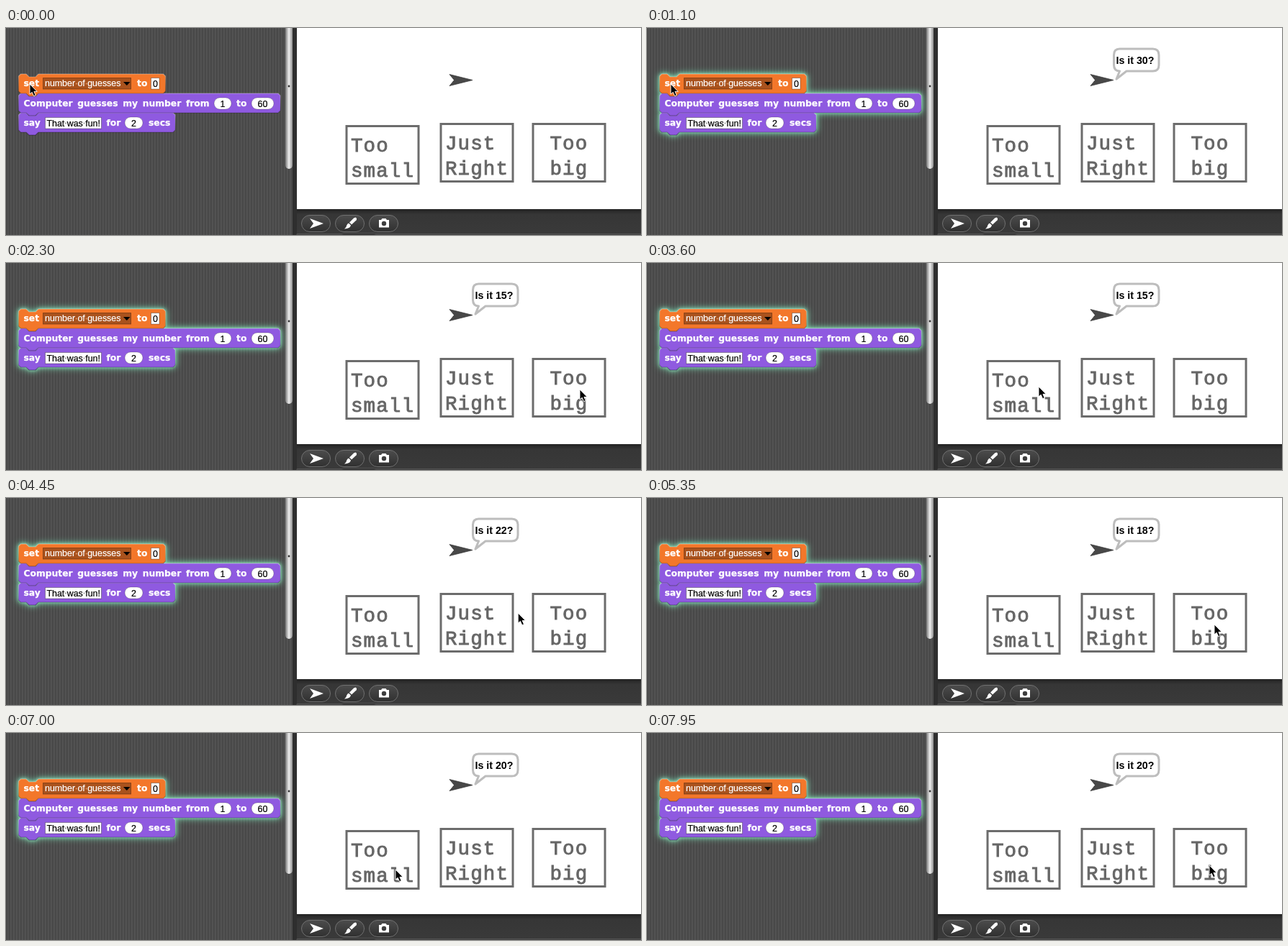
Recreate the animation shown at these times as an HTML page. Size 882 by 288 pixels, loop 8000 ms.

```html
<!DOCTYPE html>
<html lang="en">
<head>
<meta charset="utf-8">
<title>Guessing game</title>
<style>
  html, body { margin: 0; width: 100%; height: 100%; overflow: hidden; background: #333; }
  svg { display: block; width: 882px; height: 288px; }
  .label { font: bold 12.3px "DejaVu Sans", sans-serif; word-spacing: 2.4px; fill: #fff; stroke: #fff; stroke-width: .25; }
  .value, .variable { font: 12.4px "Liberation Sans", sans-serif; fill: #000; stroke: #000; stroke-width: .2; }
  .variable { fill: #fff; stroke: #fff; }
  .choice { font: 27.5px "Liberation Mono", monospace; letter-spacing: 1.1px; fill: #666; stroke: #666; stroke-width: .9; }
  .speech { font: bold 14.2px "Liberation Sans", sans-serif; text-anchor: middle; }
  .glow { filter: drop-shadow(0 0 2px #8fd8b8) drop-shadow(0 0 5px #78d8ad); }
</style>
</head>
<body>
<svg viewBox="0 0 882 288">
  <defs>
    <pattern id="stripes" width="4" height="4" patternUnits="userSpaceOnUse">
      <rect width="4" height="4" fill="#525252"/>
      <rect width="1.6" height="4" fill="#464646"/>
    </pattern>
    <linearGradient id="bevel" x2="0" y2="1">
      <stop offset="0" stop-color="#fff" stop-opacity=".35"/>
      <stop offset=".3" stop-color="#fff" stop-opacity=".1"/>
      <stop offset=".7" stop-color="#000" stop-opacity=".1"/>
      <stop offset="1" stop-color="#000" stop-opacity=".4"/>
    </linearGradient>
    <linearGradient id="handle">
      <stop offset="0" stop-color="#777"/>
      <stop offset=".5" stop-color="#f0f0f0"/>
      <stop offset="1" stop-color="#8c8c8c"/>
    </linearGradient>
    <linearGradient id="bar" x2="0" y2="1">
      <stop offset="0" stop-color="#222"/>
      <stop offset=".2" stop-color="#363636"/>
      <stop offset="1" stop-color="#3a3a3a"/>
    </linearGradient>
    <linearGradient id="button" x2="0" y2="1">
      <stop offset="0" stop-color="#4c4c4c"/>
      <stop offset="1" stop-color="#303030"/>
    </linearGradient>
  </defs>

  <rect width="398" height="288" fill="url(#stripes)"/>
  <rect x="388" y="-20" width="10" height="216" rx="5" fill="url(#handle)"/>
  <rect x="398" width="6" height="288" fill="#2e2e2e"/>
  <circle cx="393" cy="81" r="1.4" fill="#333"/>

  <rect x="404" y="0" width="478" height="252" fill="#fff"/>
  <rect x="404" y="252" width="478" height="36" fill="url(#bar)"/>
  <path d="M404 286.5H466L469 285.5H511L514 286.5H882V288H404Z" fill="#2a2a2a" stroke="#555"/>
  <g id="buttons" fill="url(#button)" stroke="#707070"></g>
  <g fill="#fff">
    <path d="M422 265L441 272L422 279L427 272Z"/>
    <path d="M485.500 263.500Q488 265 486.500 267.500L480 273.500L477 270.500L483 264.500Z"/>
    <path d="M476 271.500L479 274.500Q478 279 470 279.500Q473 277.500 473 275Q474 272 476 271.500Z"/>
    <path fill-rule="evenodd" d="M518 267H521L522.5 265H527.5L529 267H532V277.5H518ZM525 268.800A3.200 3.200 0 1 0 525 275.200A3.200 3.200 0 1 0 525 268.800Z"/>
  </g>

  <g id="script"></g>
  <g id="choices"></g>
  <path d="M616 64.5L648 72.500L616 80.500L622.500 72.500Z" fill="#484848" stroke="#303030" stroke-width=".7"/>
  <path id="tail" d=""/>
  <g id="bubble">
    <path d="M656.5 29H702.500Q711 29 711 37.500V51.500Q711 60 702.500 60H666L652 71L656.500 60Q648.500 59.500 648.500 51.500V37.500Q648.500 29 656.500 29Z"
      fill="#fff" stroke="#bdbdbd" stroke-width="3" stroke-linejoin="round"/>
    <text id="speech" class="speech" x="678" y="50"></text>
  </g>
  <path id="cursor" d="M0 0V14L3.2 11.3L5.6 16.7L8.2 15.6L5.9 10.4H10.2Z" fill="#000" stroke="#fff" stroke-width=".9"/>
</svg>
<script>
const $ = id => document.getElementById(id);
const ORANGE = '#f3772a', PURPLE = '#8f5ae0';

const text = (cls, x, y, words) => `<text class="${cls}" x="${x}" y="${y}">${words}</text>`;
const rect = (x, y, w, h, attrs) => `<rect x="${x}" y="${y}" width="${w}" height="${h}" ${attrs}/>`;
const dot = (x, y, color) => `<circle cx="${x}" cy="${y}" r=".9" fill="${color}"/>`;
const pill = (x, y, w) => rect(x, y, w, 16, 'rx="8" fill="#fff" stroke="#0004" stroke-width=".8"');
const field = (x, y, w, fill) => rect(x, y, w, 15.5, `fill="${fill}" stroke="#0005"`);

// Command block with a dent in its top edge and a matching tab below.
function block(y, width, color) {
  const x = 17.5, right = x + width, bottom = y + 27;
  const d = `M${x} ${y + 3}L${x + 3} ${y}H28L32 ${y + 4}H41L45 ${y}H${right - 3}L${right} ${y + 3}
    V${bottom - 3}L${right - 3} ${bottom}H45L41 ${bottom + 4}H32L28 ${bottom}H${x + 3}L${x} ${bottom - 3}Z`;
  return `<path d="${d}" fill="${color}" stroke="url(#bevel)" stroke-width="1.2"/>`;
}

$('script').innerHTML = [
  block(118, 217.5, PURPLE), block(91, 363.5, PURPLE), block(64, 204, ORANGE),
  text('label', 24.5, 81, 'set'), field(51.5, 69.5, 122, '#a9521d'),
  text('variable', 54, 81, 'number of guesses'), dot(97.8, 77.5, '#e8a070'), dot(111.6, 77.5, '#e8a070'),
  '<path d="M163 75H172.5L167.8 80Z"/>',
  text('label', 182, 81, 'to'), field(201.5, 69.5, 11.5, '#fff'), text('value', 204, 81.5, '0'),
  text('label', 24.5, 109, 'Computer guesses my number from'),
  pill(289, 97, 24), text('value', 297.5, 109.5, '1'), text('label', 320, 109, 'to'),
  pill(341, 97, 31), text('value', 349.5, 109.5, '60'),
  text('label', 24.5, 136, 'say'), field(54.5, 124.5, 78, '#fff'), text('value', 56.5, 136.5, 'That was fun!'),
  dot(83, 132.5, '#888'), dot(108.5, 132.5, '#888'),
  text('label', 139.5, 136, 'for'), pill(165, 124, 25), text('value', 174, 136.5, '2'),
  text('label', 198, 136, 'secs')
].join('');

const choice = (x, y, textX, top, bottom) =>
  rect(x, y, 100, 80, 'fill="none" stroke="#6c6c6c" stroke-width="3"') +
  text('choice', textX, y + 35, top) + text('choice', textX, y + 70, bottom);
$('choices').innerHTML = choice(473, 136.5, 479, 'Too', 'small') +
  choice(604, 133.5, 610, 'Just', 'Right') + choice(732, 133.5, 755.5, 'Too', 'big');

$('buttons').innerHTML = [410.5, 457.5, 504.5].map(x => rect(x, 260.5, 40, 23, 'rx="11.5"')).join('');

const LOOP = 8000, START = 300;
const guesses = [[0, 30], [2150, 15], [3750, 22], [5200, 18], [6650, 20]];

const smooth = u => u * u * (3 - 2 * u);
const slowDown = u => u * (2 - u);
// Each move: start, end, target point, height of the curve's control point, easing.
const moves = [
  [1150, 1550, 855, 160, 110, smooth],
  [1550, 2000, 797, 176, 166, slowDown],
  [2580, 3300, 544, 172, 230, smooth],
  [3950, 4750, 788, 176, 140, smooth],
  [5600, 6350, 541, 190, 225, smooth],
  [7080, 7600, 781, 184, 187, smooth]
];

function cursorAt(t) {
  let x = 33, y = 78;
  for (const [start, end, toX, toY, bend, ease] of moves) {
    if (t < start) break;
    const u = ease(Math.min(1, (t - start) / (end - start))), v = 1 - u;
    x += (toX - x) * u;
    y = v * v * y + 2 * u * v * bend + u * u * toY;
  }
  return [x, y];
}

function draw() {
  const t = performance.now() % LOOP, running = t >= START;
  $('script').setAttribute('class', running ? 'glow' : '');
  $('bubble').setAttribute('visibility', running ? 'visible' : 'hidden');
  $('speech').textContent = `Is it ${guesses.filter(([time]) => time <= t).pop()[1]}?`;
  $('cursor').setAttribute('transform', `translate(${cursorAt(t)})`);
  requestAnimationFrame(draw);
}
draw();
</script>
</body>
</html>
```
